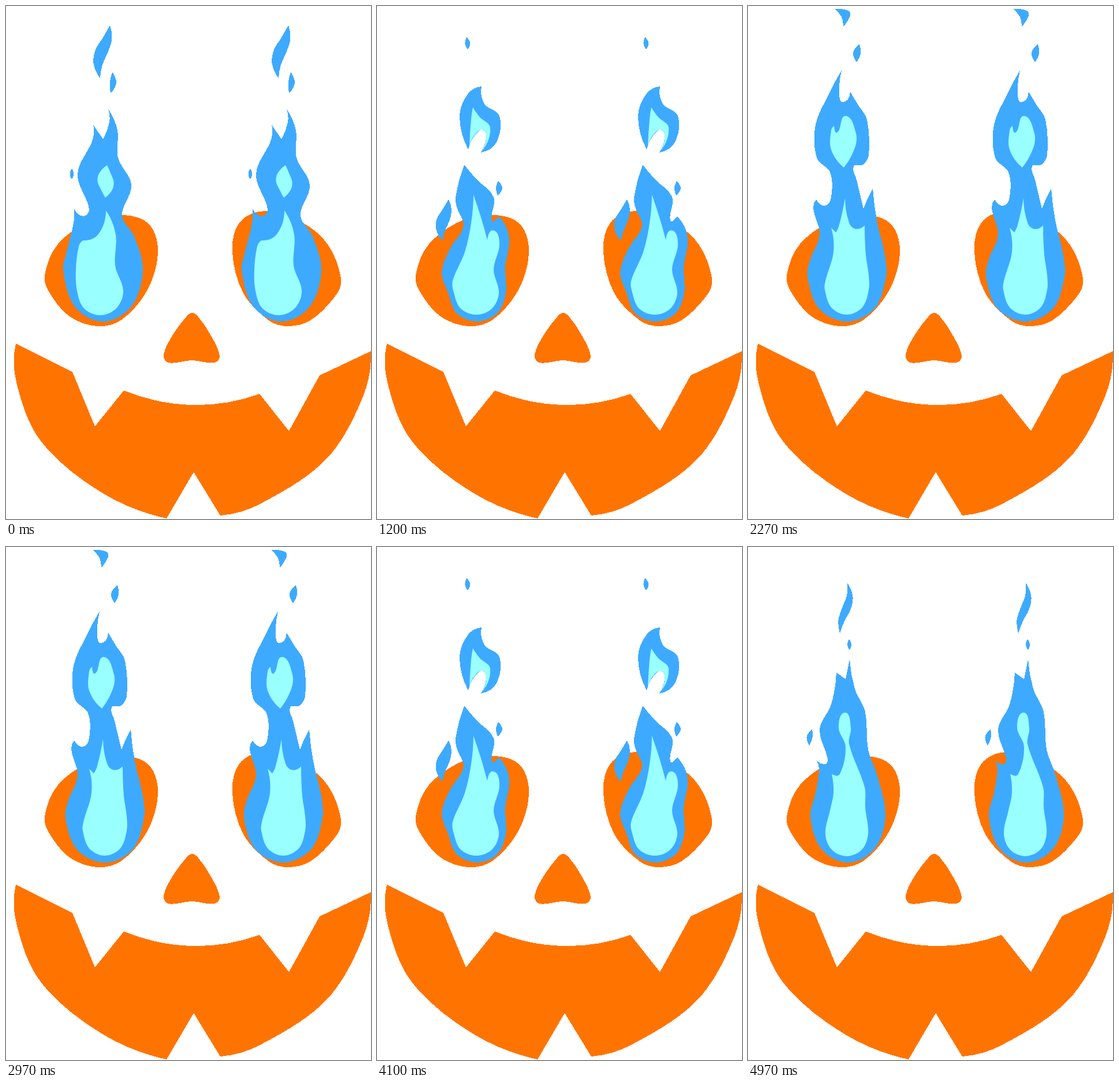
An HTML page that plays this animation: 632x886 px, repeating every 5030 ms.

```html
<!DOCTYPE html>
<html lang="en">
<head>
<meta charset="utf-8">
<title>Pumpkin with blue flames</title>
<style>
  html, body { margin: 0; width: 100%; height: 100%; overflow: hidden; background: #fff; }
  svg { display: block; width: 632px; height: 886px; }
  .face { fill: #ff7400; shape-rendering: crispEdges; }
  .outer { fill: #3eaaff; shape-rendering: crispEdges; }
  .inner { fill: #99ffff; }
</style>
</head>
<body>
<svg viewBox="0 0 632 886">
  <path class="face" id="face"/>
  <g id="flame"><path class="outer" id="outer"/><path class="inner" id="inner"/></g>
  <use href="#flame" x="309"/>
</svg>
<script>
const LOOP = 5030, STEPS = 63, { PI, sin, cos, hypot } = Math;
const $ = id => document.getElementById(id);
const pt = (x, y, sharp = false) => ({ x, y, sharp });

// Key points "x,y"; "!" marks a sharp corner.
const points = text => text.split(' ').map(s => {
  const [x, y] = s.split(',').map(parseFloat);
  return pt(x, y, s.endsWith('!'));
});

// Smooth closed path through the points.
function outline(pts) {
  const at = i => pts[(i + pts.length) % pts.length];
  const handle = (i, len) => {
    const p = at(i), a = at(i - 1), b = at(i + 1);
    const k = len / (hypot(b.x - a.x, b.y - a.y) || 1);
    return pt(p.x + (b.x - a.x) * k, p.y + (b.y - a.y) * k);
  };
  // Control point at a corner, aimed at the other end's handle.
  const bend = (from, to, h) => pt(
    from.x + (to.x + (h.x - to.x) * 1.5 - from.x) * 2 / 3,
    from.y + (to.y + (h.y - to.y) * 1.5 - from.y) * 2 / 3);
  const xy = p => p.x.toFixed(1) + ' ' + p.y.toFixed(1);
  return 'M' + xy(pts[0]) + pts.map((p, i) => {
    const q = at(i + 1), len = hypot(q.x - p.x, q.y - p.y) / 3;
    if (p.sharp && q.sharp) return 'L' + xy(q);
    let c1 = handle(i, len), c2 = handle(i + 1, -len);
    if (p.sharp) c1 = bend(p, q, c2);
    if (q.sharp) c2 = bend(q, p, c1);
    return 'C' + [c1, c2, q].map(xy).join(' ');
  }).join('') + 'Z';
}
const draw = shapes => shapes.map(outline).join('');

// Round lower half of a flame, from right to left.
const bowl = (cx, w, y, bottom) => [0, 1, 2, 3, 4].map(i =>
  pt(cx + w * cos(i * PI / 4), y + (bottom - y) * sin(i * PI / 4)));

const flame = (cx, w, y, bottom, top) => [...bowl(cx, w, y, bottom), ...points(top)];

// Spark with two pointed ends; bow curves it, wave gives it an S.
function leaf(x0, y0, x1, y1, w, bow = 0, wave = 0) {
  const dx = x1 - x0, dy = y1 - y0, len = hypot(dx, dy);
  const edge = (t, side) => {
    const off = (bow + side * w / 2) * sin(PI * t) + wave * sin(2 * PI * t);
    return pt(x0 + dx * t + off * dy / len, y0 + dy * t - off * dx / len);
  };
  return [pt(x0, y0, true), edge(.25, 1), edge(.5, 1), edge(.75, 1),
          pt(x1, y1, true), edge(.75, -1), edge(.5, -1), edge(.25, -1)];
}

// Tapering flame whose sway travels upwards with the phase.
function plume(w, y, bottom, tip, phase) {
  const cx = 171;
  const edge = (t, side) => pt(
    cx + side * w * (1 - t) ** .75 + 14 * t * sin(2 * PI * t - phase),
    y + (tip - y) * t);
  return [...bowl(cx, w, y, bottom), edge(.25, -1), edge(.5, -1), edge(.75, -1),
          pt(cx - 6 + 6 * sin(phase), tip, true), edge(.75, 1), edge(.5, 1), edge(.25, 1)];
}

// A puff breaks off and shrinks upwards while the next flame grows below it.
function rising(u) {
  const tip = Math.max(4, 110 - 50 * u), tail = 300 - 60 * u, w = 108 - 24 * u;
  const inset = (tail - tip) / 4;
  return {
    outer: [plume(67 - 2 * u, 462, 545, 296 - 34 * u, u), leaf(168, tip, 168, tail, w, 0, 3)],
    inner: [plume(39, 492, 533, 325, u),
            ...(u < 3 ? [leaf(168, tip + inset, 168, tail - inset, w / 2)] : [])]
  };
}

const face = [
  '205,361 248,377 263,425 245,490 200,542 158,553 110,536 74,493 67,465 90,411 150,369',
  '450,354 405,373 392,425 411,496 455,543 487,553 527,543 573,497 580,470 558,413 515,375',
  '322,530 312,537 290,566 273,602 281,616 322,612 361,616 370,604 353,566 333,537',
  '17,583! 115,632! 154,726! 204,664! 322,689 439,670! 490,734! 543,638! 632,596! 618,675 ' +
  '555,782 440,860 371,880! 325,805! 278,885! 165,840 60,751 18,650'
].map(points);

const tall = {
  outer: [
    flame(168, 69, 457, 545, '104,428 117,375 118,350! 134,363 144,351 124,290 150,231 ' +
      '151,205! 168,230! 179,200 177,178! 193,215 194,262 217,309 201,362 222,398'),
    leaf(180, 33, 163, 125, 22, -6, 4),
    leaf(184, 114, 181, 151, 11, 3),
    leaf(114, 281, 114, 299, 7)
  ],
  inner: [
    flame(163, 40, 492, 534, '121,455 126,415 133,405! 160,394 173,353! 190,395 189,448'),
    leaf(175, 275, 172, 331, 28, -1, -2)
  ]
};

const forked = {
  outer: [
    flame(171, 68, 468, 545, '107,440 124,395 113,350 118,334! 136,344 145,322 142,287 ' +
      '119,262 117,205 140,152 162,111! 158,148 164,166 177,148! 190,170 206,196 209,258 ' +
      '199,274 183,277 188,300 200,350! 207,333 216,315! 223,370 237,430'),
    leaf(150, 5, 165, 36, 17, 13),
    leaf(193, 66, 188, 97, 13, -2)
  ],
  inner: [
    flame(171, 38, 490, 533, '134,475 148,425 144,383! 152,391! 158,378 168,332! 175,374 ' +
      '186,385 202,379! 204,430 209,465'),
    points('169,190 187,220 185,245 166,279! 144,248 144,215 149,207! 155,218')
  ]
};

const split = {
  outer: [
    flame(173, 50, 495, 545, '112,460 127,418 150,380 139,350 136,330 151,274! 172,299 ' +
      '202,330 199,370 211,363! 229,400 222,450'),
    points('181,139! 186,169 212,190 207,235 180,253! 189,221 178,214 158,248! 143,190 158,151'),
    leaf(155, 54, 157, 75, 9, 1),
    leaf(210, 302, 209, 327, 11, 2),
    leaf(124, 334, 113, 406, 22, -4, 3)
  ],
  inner: [
    flame(172, 39, 495, 533, '131,475 152,425 163,375 167,326! 180,365 191,404! 203,388 ' +
      '212,412 202,455'),
    points('166,175! 178,192 196,210 182,250! 189,221 178,214 160,242! 163,195')
  ]
};

const fading = {
  outer: [
    plume(70, 462, 545, 232, 5),
    leaf(176, 100, 162, 203, 40, 4, 3),
    leaf(194, 228, 193, 250, 8),
    leaf(117, 318, 108, 364, 16)
  ],
  inner: [plume(38, 492, 533, 305, 5)]
};

const slim = {
  outer: [
    flame(173, 65, 465, 545, '117,425 123,385 119,369! 134,375 138,366 124,315 144,272 ' +
      '153,217! 169,228! 176,194! 185,245 203,285 208,350 224,395'),
    leaf(172, 62, 159, 149, 15, 5, 4),
    leaf(175, 159, 176, 178, 7),
    leaf(111, 315, 106, 343, 10, -2)
  ],
  inner: [
    flame(171, 37, 495, 534, '142,455 148,425 145,392! 159,392 169,345 157,312 168,286 ' +
      '178,312 175,340 202,415 203,450')
  ]
};

const poses = [tall, forked, ...[1, 2, 3, 4].map(rising), split, fading, slim]
  .map(p => ({ outer: draw(p.outer), inner: draw(p.inner) }));

// 12.5 poses a second, held on a 30 Hz grid and rounded to 10 ms.
const starts = Array.from({ length: STEPS },
  (_, k) => Math.round(Math.ceil(k * 12 / 5) * 10 / 3) * 10);

function show(time) {
  const t = time % LOOP;
  let k = STEPS - 1;
  while (starts[k] > t) k--;
  const pose = poses[k % poses.length];
  $('outer').setAttribute('d', pose.outer);
  $('inner').setAttribute('d', pose.inner);
}

$('face').setAttribute('d', draw(face));
const began = performance.now();
function tick() {
  show(performance.now() - began);
  requestAnimationFrame(tick);
}
tick();
</script>
</body>
</html>
```
